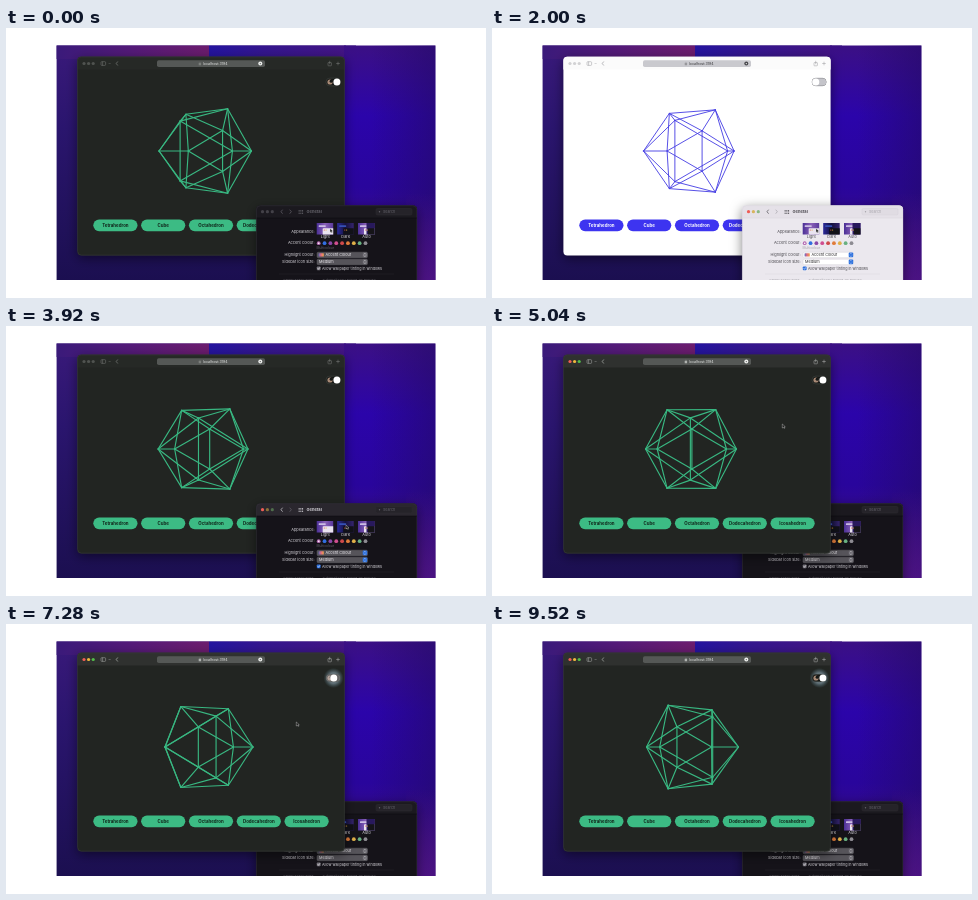
An HTML page with a canvas that plays this animation: 480 px wide and 270 px high, repeating every 9.6 s.

```html
<!DOCTYPE html>
<html lang="en">
<head>
<meta charset="utf-8">
<title>Icosahedron theme demo</title>
<style>
html, body { margin: 0; width: 100%; height: 100%; overflow: hidden; background: #fff; }
canvas { display: block; width: 480px; height: 270px; }
</style>
</head>
<body>
<canvas id="stage" width="480" height="270"></canvas>
<script>
const ctx = document.getElementById('stage').getContext('2d');
const LOOP = 9600;
const FONT = 'Inter, Roboto, sans-serif';
const TAU = Math.PI * 2;

// Event times in ms
const SETTINGS_FOCUS = 1600, SYSTEM_LIGHT = 1760, SYSTEM_DARK = 3440;
const BROWSER_FOCUS = 4880, PAGE_LIGHT = 5860, PAGE_DARK = 7130;

const clamp01 = v => Math.max(0, Math.min(1, v));
const ease = v => { v = clamp01(v); return v * v * (3 - 2 * v); };

function box(x, y, w, h, r, fill, stroke) {
  ctx.beginPath();
  ctx.roundRect(x, y, w, h, r);
  if (fill) { ctx.fillStyle = fill; ctx.fill(); }
  if (stroke) { ctx.strokeStyle = stroke; ctx.lineWidth = 0.5; ctx.stroke(); }
}
function dot(x, y, r, fill) {
  ctx.beginPath();
  ctx.arc(x, y, r, 0, TAU);
  ctx.fillStyle = fill;
  ctx.fill();
}
function path(points, color, width = 0.7) {
  ctx.beginPath();
  points.forEach(([x, y], i) => i ? ctx.lineTo(x, y) : ctx.moveTo(x, y));
  ctx.strokeStyle = color;
  ctx.lineWidth = width;
  ctx.stroke();
}
function label(str, x, y, size, color, align = 'left', weight = 400) {
  ctx.font = `${weight} ${size}px ${FONT}`;
  ctx.textAlign = align;
  ctx.textBaseline = 'middle';
  ctx.fillStyle = color;
  ctx.fillText(str, x, y);
}
function gradient(x0, y0, x1, y1, stops) {
  const g = ctx.createLinearGradient(x0, y0, x1, y1);
  stops.forEach(([at, color]) => g.addColorStop(at, color));
  return g;
}
function fade(x, y, w, h, vertical, stops) {
  ctx.fillStyle = gradient(x, y, vertical ? x : x + w, vertical ? y + h : y, stops);
  ctx.fillRect(x, y, w, h);
}
function halo(x, y, r, inner, outer) {
  const g = ctx.createRadialGradient(x, y, 0, x, y, r);
  g.addColorStop(0, inner);
  g.addColorStop(0.5, inner);
  g.addColorStop(1, outer);
  ctx.fillStyle = g;
  ctx.fillRect(x - r, y - r, 2 * r, 2 * r);
}
function withShadow(blur, alpha, draw) {
  ctx.save();
  ctx.shadowColor = `rgba(0,0,0,${alpha})`;
  ctx.shadowBlur = blur;
  ctx.shadowOffsetY = 3;
  draw();
  ctx.restore();
}
function trafficLights(x, y, gap, colors) {
  colors.forEach((c, i) => dot(x + i * gap, y, 1.6, c));
}
const chevron = (x, y, dir, color) =>
  path([[x + dir, y - 2], [x - dir, y], [x + dir, y + 2]], color);

function wallpaper() {
  fade(50, 17, 300, 236, true, [[0, '#39197a'], [0.35, '#2a156e'], [1, '#1b0f50']]);
  fade(50, 17, 153, 14, false, [[0, '#3a1a7a'], [0.5, '#541a78'], [1, '#6c1c6e']]);
  fade(203, 17, 137, 14, false, [[0, '#2414a0'], [0.4, '#34168e'], [1, '#431484']]);
  fade(338, 17, 92, 236, true, [
    [0, '#3b1084'], [0.3, '#2b04aa'], [0.6, '#29059c'], [0.8, '#380c8a'], [1, '#4a127c']]);
  fade(365, 17, 65, 236, false, [[0, 'rgba(36,10,104,0)'], [1, 'rgba(36,10,104,.6)']]);
  fade(400, 165, 30, 88, true, [[0, 'rgba(80,20,135,0)'], [1, 'rgba(80,20,135,.8)']]);
}

// Icosahedron spinning on its vertical two-fold axis
const PHI = (1 + Math.sqrt(5)) / 2;
const vertices = [];
for (const a of [-1, 1]) for (const b of [-PHI, PHI])
  vertices.push([a, b, 0], [0, a, b], [b, 0, a]);
const edges = [];
vertices.forEach((p, i) => vertices.forEach((q, j) => {
  if (j > i && Math.abs(Math.hypot(...p.map((v, k) => v - q[k])) - 2) < 0.01) edges.push([i, j]);
}));

function icosahedron(t, color, width) {
  const angle = (-31.4 + 0.00602 * t) * Math.PI / 180;
  const c = Math.cos(angle), s = Math.sin(angle), depth = 7.4, scale = 24.3;
  const flat = vertices.map(([x, y, z]) => {
    const k = scale * depth / (depth - (z * c - x * s));
    return [199.3 + (x * c + z * s) * k, 123 - y * k];
  });
  ctx.lineCap = 'round';
  edges.forEach(([i, j]) => path([flat[i], flat[j]], color, width));
  ctx.lineCap = 'butt';
}

function themeToggle(t, light, focused) {
  let pos = light ? 0 : 1;
  if (t >= PAGE_LIGHT && t < PAGE_DARK) pos = 1 - ease((t - PAGE_LIGHT) / 300);
  else if (t >= PAGE_DARK) pos = ease((t - PAGE_DARK) / 280);
  if (focused) halo(327.5, 54, 10,
    light ? 'rgba(40,100,190,.9)' : 'rgba(150,175,190,.6)',
    light ? 'rgba(110,170,240,0)' : 'rgba(90,130,145,0)');
  box(320, 50.2, 14.2, 7.6, 3.8, '#151715', light ? '#85858a' : '#4b504c');
  dot(324, 54, 2.6, '#a88a76');
  dot(325.2, 53.2, 1.6, '#151715');
  box(320, 50.2, 14.2, 7.6, 3.8, `rgba(196,196,202,${1 - pos})`);
  dot(323.8 + 7.1 * pos, 54, 3.5, '#fff');
}

function browser(t, system, light, focused) {
  const ink = system ? '#98989c' : focused ? '#b0b3b0' : '#7c7f7c';
  withShadow(12, 0.5, () => box(71.4, 28.7, 267.2, 198.7, 4, light ? '#fff' : '#222522'));
  box(71.4, 28.7, 267.2, 12.8, [4, 4, 0, 0],
    system ? '#fbfbfb' : light ? '#303033' : focused ? '#2f312f' : '#262926');
  if (!light) box(71.6, 28.9, 266.8, 198.3, 4, null, '#3d403d');

  const idle = system ? '#d2d2d4' : '#505350';
  trafficLights(78, 35.5, 4.6, focused ? ['#f25d55', '#efb83c', '#52bd4a'] : [idle, idle, idle]);
  box(95, 33.7, 4.6, 3.7, 0.8, null, ink);
  path([[96.6, 33.7], [96.6, 37.4]], ink, 0.5);
  path([[102.6, 35], [103.6, 36], [104.6, 35]], ink, 0.4);
  chevron(111, 35.5, 0.8, ink);
  box(151, 32.3, 108, 6.7, 1.8, system ? '#c9c9ce' : '#555856');
  box(192.7, 35.1, 2.4, 2.1, 0.3, ink);
  ctx.beginPath();
  ctx.arc(193.9, 35, 0.8, Math.PI, 0);
  ctx.strokeStyle = ink;
  ctx.lineWidth = 0.4;
  ctx.stroke();
  label('localhost:3194', 197, 35.8, 3.6, system ? '#38383b' : '#e4e6e4');
  dot(254.3, 35.6, 2, system ? '#4a4a4e' : '#eceeec');
  dot(254.3, 35.6, 0.6, system ? '#fff' : '#555');
  box(322, 34.5, 3.4, 3.3, 0.5, null, ink);
  path([[323.7, 36.2], [323.7, 32.8]], ink, 0.5);
  path([[330.2, 35.5], [333.8, 35.5]], ink, 0.5);
  path([[332, 33.7], [332, 37.3]], ink, 0.5);

  themeToggle(t, light, focused && t >= PAGE_LIGHT - 500);
  icosahedron(t, light ? '#443de4' : '#38b781', light ? 0.9 : 1.15);

  ['Tetrahedron', 'Cube', 'Octahedron', 'Dodecahedron', 'Icosahedron'].forEach((name, i) => {
    const x = 87.3 + i * 47.8;
    box(x, 191.5, 44.2, 11.7, 5.85, light ? '#3d34f0' : '#3cbb84');
    label(name, x + 22.1, 197.5, 4.4, light ? '#fff' : '#10251a', 'center', 700);
  });
}

function thumbnail(x, name, kind, ink) {
  const dark = kind === 'dark';
  fade(x, 195, 16.5, 11.5, false, dark
    ? [[0, '#2b2a9a'], [0.5, '#15123c'], [1, '#35246e']]
    : [[0, '#4a2f96'], [0.5, '#8b62b8'], [1, '#5a3a9c']]);
  box(x + 6, 200.3, 10.5, 6.2, [0.8, 0, 0, 0], dark ? '#111118' : '#e9e4f0');
  box(x + 2, 197.3, 7, 1.6, 0.5, dark ? '#3650b5' : '#cbbde4');
  if (kind === 'auto') {
    box(x + 8.5, 195, 8, 11.5, 0, '#28195c');
    box(x + 10, 200.3, 6.5, 6.2, 0, '#151418');
  }
  dot(x + 7.6, 202, 0.6, '#e75750');
  dot(x + 9.4, 202, 0.6, '#e3aa36');
  label(name, x + 8.5, 209.2, 3.9, ink, 'center');
}

function dropdown(y, text, light, focused) {
  box(311, y, 50.5, 5.5, 1.2, light ? '#fff' : '#56545a', light ? '#d3d1d6' : '#5e5c62');
  box(356.7, y + 0.4, 4.5, 4.7, 1, focused ? '#2b6fdd' : light ? '#c6c4ca' : '#6b6970');
  path([[358, y + 2.1], [358.9, y + 1.2], [359.8, y + 2.1]], '#fff', 0.5);
  path([[358, y + 3.4], [358.9, y + 4.3], [359.8, y + 3.4]], '#fff', 0.5);
  label(text, text === 'Medium' ? 313 : 319.5, y + 2.9, 3.8, light ? '#28272a' : '#f0eef2');
}

function settings(light, focused) {
  const ink = light ? '#4a484e' : '#d6d4da';
  const dim = light ? '#a5a3aa' : '#66646c';
  withShadow(12, 0.5, () => box(250.2, 177.5, 160.8, 86, 4, light ? '#ebe8ee' : '#151319'));
  box(250.2, 177.5, 160.8, 12.5, [4, 4, 0, 0], light ? '#e5e1e8' : focused ? '#2a272e' : '#1b191f');
  box(250.4, 177.7, 160.4, 86, 4, null, light ? '#d8d4dc' : '#37343c');
  path([[250.5, 190], [411, 190]], light ? '#d6d3da' : '#0a090c', 0.5);
  const idle = light ? '#cbc8cf' : '#434148';
  trafficLights(256.5, 183.7, 4.9, focused
    ? ['#ef5d55', light ? '#d8b45c' : '#8b7138', light ? '#88b884' : '#4f6e4c'] : [idle, idle, idle]);
  chevron(275.8, 183.7, 0.8, focused ? ink : dim);
  chevron(284.5, 183.7, -0.8, dim);
  for (let i = 0; i < 9; i++) {
    ctx.fillStyle = focused ? ink : dim;
    ctx.fillRect(292.6 + i % 3 * 1.7, 182 + Math.floor(i / 3) * 1.5, 1.1, 0.8);
  }
  label('General', 300.5, 183.9, 4, focused ? ink : dim, 'left', 700);
  box(370, 180.5, 36, 6.5, 1.4, light ? '#e0dce3' : '#252329', light ? '#d5d1d9' : '#2e2c33');
  dot(373.5, 183.7, 0.7, dim);
  label('Search', 377, 184, 3.7, dim);

  label('Appearance:', 308.7, 204, 3.9, ink, 'right');
  thumbnail(310.7, 'Light', 'light', ink);
  thumbnail(331.2, 'Dark', 'dark', ink);
  thumbnail(352, 'Auto', 'auto', ink);

  label('Accent colour:', 308.7, 215.3, 3.9, ink, 'right');
  ['#b46ab2', '#316ee0', '#8a48a8', '#d04f90', '#cf4a4a', '#e07c3a', '#dfb048', '#68b080', '#8d8b92']
    .forEach((c, i) => dot(312.7 + i * 5.85, 215.2, 1.9, c));
  dot(312.7, 215.2, 0.8, '#fff');
  label('Multicolour', 310.5, 220.3, 3.3, dim);
  label('Highlight colour:', 308.7, 227.3, 3.9, ink, 'right');
  dropdown(224.2, 'Accent Colour', light, focused);
  box(312.6, 225.3, 5.2, 3.3, 0.5, gradient(312, 0, 318, 0, [[0, '#4268d0'], [0.5, '#e36b80'], [1, '#eca847']]));
  label('Sidebar icon size:', 308.7, 234.2, 3.9, ink, 'right');
  dropdown(231.2, 'Medium', light, focused);
  box(310.8, 238.5, 3.8, 3.8, 0.8, focused ? '#2b6fdd' : '#77747d');
  path([[311.7, 240.4], [312.5, 241.3], [313.8, 239.4]], '#fff', 0.6);
  label('Allow wallpaper tinting in windows', 316, 240.6, 3.7, ink);
  path([[273, 246], [388, 246]], light ? '#dad7de' : '#27252b', 0.5);
  label('Show scroll bars:', 308.7, 252.4, 3.9, dim, 'right');
  label('Automatically based on mouse', 316, 252.4, 3.7, dim);
}

function pointer(t) {
  if (t > 8300) return;
  const across = ease((t - 2960) / 400), away = ease((t - 4100) / 650);
  const x = 324 + 16 * across - 49.7 * away, y = 200.5 - 1.5 * across - 101 * away;
  ctx.beginPath();
  [[0, 0], [0, 4], [1, 3.2], [1.8, 4.5], [2.4, 4.1], [1.7, 2.9], [3, 2.8]]
    .forEach(([dx, dy]) => ctx.lineTo(x + dx, y + dy));
  ctx.closePath();
  ctx.fillStyle = '#101010';
  ctx.fill();
  ctx.strokeStyle = '#ddd';
  ctx.lineWidth = 0.4;
  ctx.stroke();
}

function render(t) {
  const system = t >= SYSTEM_LIGHT && t < SYSTEM_DARK;
  const light = system || (t >= PAGE_LIGHT && t < PAGE_DARK);
  const browserOnTop = t >= BROWSER_FOCUS;
  const drawBrowser = () => browser(t, system, light, browserOnTop);
  const drawSettings = () => settings(system, t >= SETTINGS_FOCUS && !browserOnTop);

  ctx.fillStyle = '#fff';
  ctx.fillRect(0, 0, 480, 270);
  ctx.save();
  ctx.beginPath();
  ctx.rect(50.6, 17.6, 378.8, 234.3);
  ctx.clip();
  wallpaper();
  (browserOnTop ? [drawSettings, drawBrowser] : [drawBrowser, drawSettings]).forEach(draw => draw());
  pointer(t);
  ctx.restore();
}

const start = performance.now();
function tick() {
  render((performance.now() - start) % LOOP);
  requestAnimationFrame(tick);
}
tick();
</script>
</body>
</html>
```
